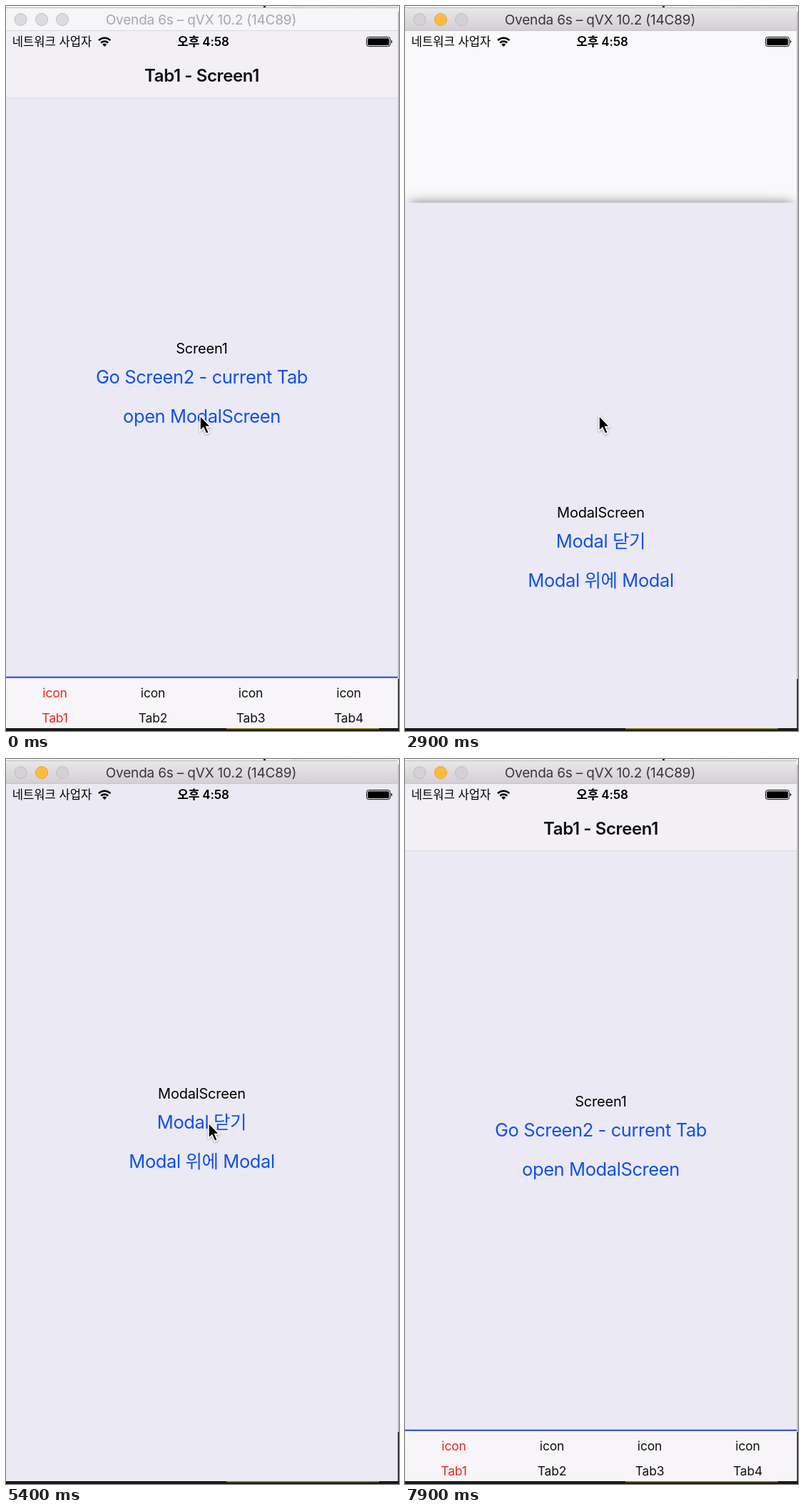
Write an HTML page that moves like this. It is 551 px wide and 1016 px high and loops after 8 s.

```html
<!DOCTYPE html>
<html lang="ko">
<head>
<meta charset="utf-8">
<title>Modal over modal</title>
<style>
  html, body { margin: 0; width: 100%; height: 100%; overflow: hidden; background: #fff; }
  svg { display: block; width: 551px; height: 1016px; }
  text { font-family: Inter, "Noto Sans CJK KR", "Noto Sans CJK", sans-serif; text-anchor: middle; letter-spacing: -.01em; }
  .label { font-size: 20px; }
  .button { font-size: 25.5px; fill: #1250e6; letter-spacing: -.016em; }
  .tab { font-size: 17.5px; }
  .status { font-size: 17px; }
  .shadow { filter: blur(8px); opacity: .5; }
</style>
</head>
<body>
<svg viewBox="0 0 551 1016">
  <defs>
    <linearGradient id="chrome" x2="0" y2="1">
      <stop stop-color="#e9e7ea"/><stop offset="1" stop-color="#d1cfd2"/>
    </linearGradient>
    <clipPath id="screen"><rect y="35" width="549.5" height="977"/></clipPath>
  </defs>

  <!-- desktop around the window -->
  <path d="M0 0H551V8H0z" fill="#f3f2f4"/>
  <path d="M361 0h3v2h-3z" fill="#222"/>
  <path d="M400 .8H551" stroke="#ccc" stroke-dasharray="2 2"/>
  <path d="M549 8h2v935h-2z" fill="#b9b8bc"/>
  <path d="M549 943h2v73H0v-5h549z" fill="#17191a"/>
  <path d="M309 1012.5H523" stroke="#8c8420" stroke-width="2"/>

  <!-- title bar -->
  <path id="bar" d="M0 35V8Q0 2.5 6 2.5H544Q549.5 2.5 549.5 8V35z"/>
  <path d="M0 2.5H549M0 35H549.5" stroke="#bcbabd" fill="none"/>
  <g id="lights" stroke="#bfbdc0">
    <circle cx="20.5" cy="19" r="8.5"/><circle id="minimize" cx="50" cy="19" r="8.5"/><circle cx="79" cy="19" r="8.5"/>
  </g>
  <text id="title" x="273.5" y="26" font-size="19">Ovenda 6s – qVX 10.2 (14C89)</text>

  <g clip-path="url(#screen)">
    <rect y="35" width="549.5" height="977" fill="#fff"/>
    <g id="home"></g>
    <g id="modal1"></g>
    <g id="modal2"></g>
  </g>

  <!-- status bar -->
  <text class="status" x="64.5" y="56" style="font-size:16.6px;letter-spacing:0">네트워크 사업자</text>
  <g fill="none" stroke="#000" stroke-width="2.6">
    <path d="M130 48.2a11.5 11.5 0 0 1 16.4 0M133.2 51.6a7 7 0 0 1 10 0"/>
    <path d="M138.2 57l-3-3a4.3 4.3 0 0 1 6 0z" fill="#000" stroke="none"/>
  </g>
  <text class="status" x="276.5" y="56" font-weight="600">오후 4:58</text>
  <rect x="505.6" y="43.6" width="33" height="13" rx="3" fill="none" stroke="#000"/>
  <rect x="507.2" y="45.2" width="29.8" height="9.8" rx="1.6"/>
  <path d="M540 47.5q3 2.5 0 5z"/>

  <g id="cursor">
    <path d="M0 0V21.5L4.8 17L8.6 25.6L12.6 23.8L8.8 15.6H15.2z" stroke="#fff" stroke-width="1.6"
          style="filter:drop-shadow(0 1.5px 1.5px rgba(0,0,0,.35))"/>
  </g>
</svg>
<script>
const LOOP = 8000, STEP = 100, HEIGHT = 977, CENTER = 274.5;
const $ = id => document.getElementById(id);
const clamp = x => Math.min(1, Math.max(0, x));

const text = (cls, y, content, x = CENTER, extra = '') =>
  `<text class="${cls}" x="${x}" y="${y}" ${extra}>${content}</text>`;

const tabs = [68.5, 206, 343, 480.5].map((x, i) => {
  const color = `fill="${i ? '#111' : '#e8281e'}"`;
  return text('tab', 968.5, 'icon', x, color) + text('tab', 1003.5, 'Tab' + (i + 1), x, color);
}).join('');

$('home').innerHTML = `
  <rect y="35" width="549.5" height="977" fill="#ebe9f3"/>
  <rect y="35" width="549.5" height="94" fill="#f2f0f5"/>
  <path d="M0 129H549.5" stroke="#d9d7de"/>
  ${text('button', 106, 'Tab1 - Screen1', CENTER, 'style="font-size:24px;font-weight:600;fill:#111"')}
  ${text('label', 487, 'Screen1')}
  ${text('button', 529, 'Go Screen2 - current Tab')}
  ${text('button', 584, 'open ModalScreen', CENTER, 'id="open"')}
  <rect y="941" width="549.5" height="71" fill="#f7f5f8"/>
  <path d="M0 940.7H549.5" stroke="#2446d8" stroke-width="2"/>${tabs}`;

for (const n of [1, 2]) $('modal' + n).innerHTML = `
  <rect class="shadow" id="shadow${n}" x="7" y="35" width="535" height="900"/>
  <g id="card${n}">
    <rect y="35" width="549.5" height="977" fill="#ebe9f3"/>
    ${text('label', 476, 'ModalScreen')}
    ${text('button', 518, 'Modal 닫기', CENTER, `id="close${n}"`)}
    ${text('button', 573, 'Modal 위에 Modal', CENTER, `id="stack${n}"`)}
  </g>`;

// cubic-bezier(.2833, .99, .31833, .99)
function ease(x) {
  if (x <= 0 || x >= 1) return clamp(x);
  const curve = (s, a, b) => 3 * s * (1 - s) * ((1 - s) * a + s * b) + s ** 3;
  let lo = 0, hi = 1;
  for (let i = 0; i < 24; i++) {
    const mid = (lo + hi) / 2;
    if (curve(mid, .2833, .31833) < x) lo = mid; else hi = mid;
  }
  return curve(lo, .99, .99);
}

// how far a modal is open, 0 to 1
const opened = (t, show, hide) => ease((t - show) / 500) - ease((t - hide) / 500);

// touch feedback: dims to 20 %, returns after release
const touch = (id, t, down, up) =>
  $(id).setAttribute('opacity', 1 - .8 * clamp((t - down) / 150) * (1 - clamp((t - up) / 250)));

function place(n, p) {
  $('modal' + n).setAttribute('transform', `translate(0 ${HEIGHT * (1 - p)})`);
  $('modal' + n).style.display = p > 0 ? '' : 'none';
  $('shadow' + n).style.display = p < 1 ? '' : 'none';
}
const fadeBehind = (id, p) => $(id).setAttribute('opacity', clamp(1 - p ** 1.3));

function draw(t) {
  const active = t >= 200;
  $('bar').setAttribute('fill', active ? 'url(#chrome)' : '#f6f5f7');
  $('lights').setAttribute('fill', active ? '#d3d1d3' : '#dddbde');
  $('minimize').setAttribute('fill', active ? '#fdbc40' : '#dddbde');
  $('minimize').setAttribute('stroke', active ? '#e0a53a' : '#bfbdc0');
  $('title').setAttribute('fill', active ? '#38363a' : '#a9a7aa');

  const first = opened(t, 800, 7147), second = opened(t, 2768, 4800);
  place(1, first);
  place(2, second);
  fadeBehind('home', first);
  fadeBehind('card1', second);

  touch('open', t, 580, 790);
  touch('stack1', t, 2560, 2760);
  touch('close2', t, 4600, 4790);
  touch('close1', t, 6600, 7140);

  const up = clamp((t - 3700) / 200), out = clamp((t - 7600) / 250) ** 2;
  const x = 272 + 12 * up - 8 * up * (1 - up) + 285 * out;
  const y = 574 - 64 * up - 10 * up * (1 - up);
  $('cursor').setAttribute('transform', `translate(${x} ${y})`);
}

function tick() {
  draw(Math.floor(performance.now() % LOOP / STEP) * STEP);
  requestAnimationFrame(tick);
}
tick();
</script>
</body>
</html>
```
